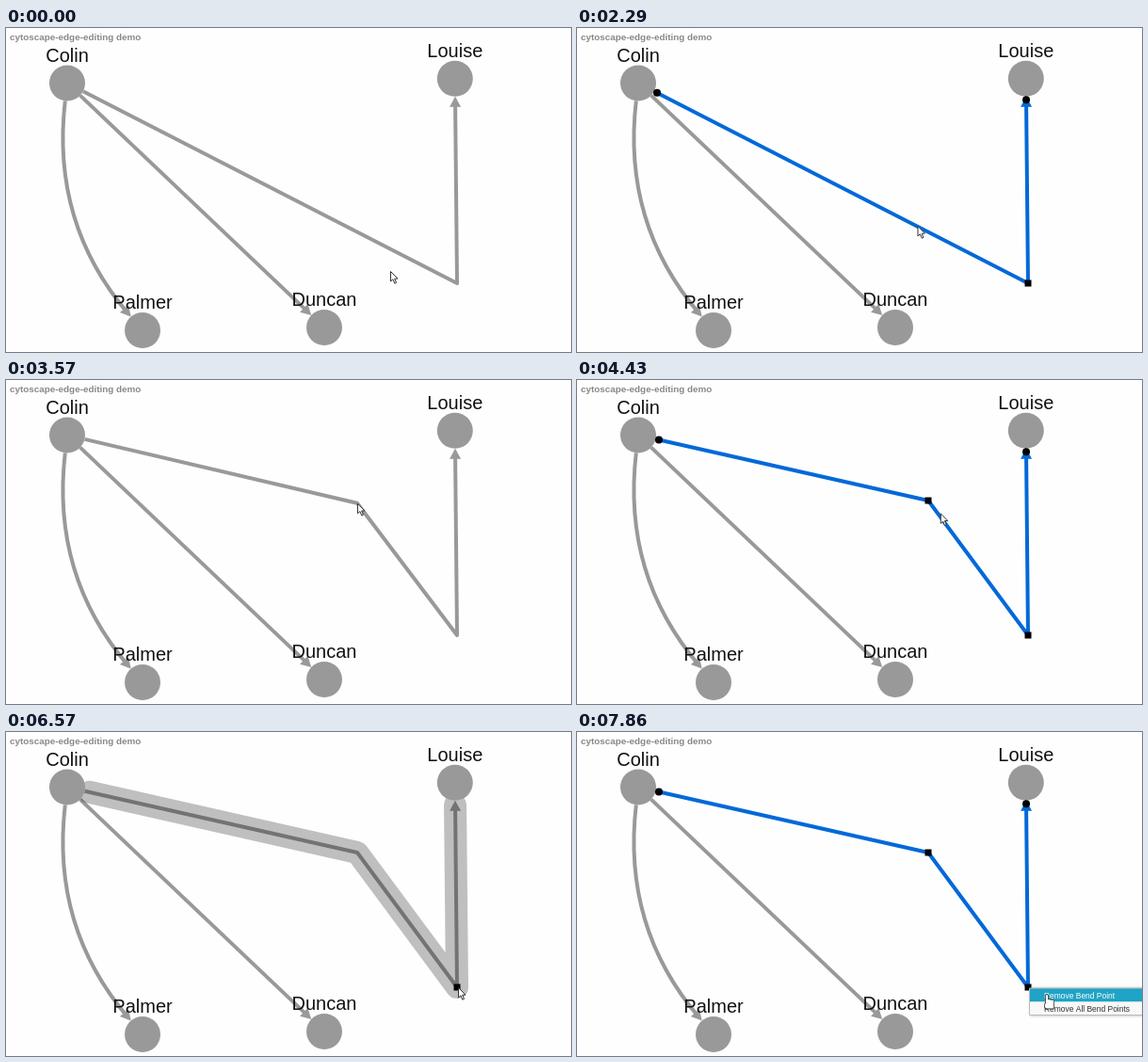
Animation, 600 px wide and 344 px high, one loop 8000 ms. Source, as an HTML page with a canvas:

```html
<!DOCTYPE html>
<html lang="en">
<head>
<meta charset="utf-8">
<title>Edge editing demo</title>
<style>
  html, body { margin: 0; width: 100%; height: 100%; overflow: hidden; background: #fefefe; }
  canvas { display: block; width: 600px; height: 344px; }
</style>
</head>
<body>
<canvas id="stage"></canvas>
<script>
const W = 600, H = 344, LOOP = 8000, TICK = 1000 / 7;
const FONT = '"Liberation Sans", Arial, sans-serif';
const GREY = '#999', BLUE = '#0169d9', R = 19;
const canvas = document.getElementById('stage');
const ctx = canvas.getContext('2d');
const dpr = window.devicePixelRatio || 1;
canvas.width = W * dpr;
canvas.height = H * dpr;

const NODES = { Colin: [65, 58.5], Louise: [476.8, 53.7], Palmer: [145, 321], Duncan: [338, 318] };
const { Colin, Louise, Palmer, Duncan } = NODES;
const CORNER = [479, 271], DROP = [373, 128];

// Ticks at which the story turns
const PRESS = 9, GRAB = 21, RELEASE = 28, RIGHT_PRESS = 46, MENU = 47, HOVER = 50;

// Pointer moves: first tick, last tick, destination
const REST = [408, 258];
const MOVES = [
  [4, 7, [429, 245]],
  [13, 20, [346, 202]],
  [GRAB, 27, [374, 128]],
  [29, 34, [389, 145]],
  [37, 40, [459, 259]],
  [40, 45, [480, 271]],
  [49, 55, [499, 279]]
];

const clamp = v => Math.min(1, Math.max(0, v));
const easeOut = f => 1 - (1 - f) ** 3;
const mix = (a, b, f) => a.map((v, i) => v + (b[i] - v) * f);
const toward = (a, b, d) => mix(a, b, d / Math.hypot(b[0] - a[0], b[1] - a[1]));

function pointerAt(k) {
  return MOVES.reduce((p, [from, to, goal]) =>
    mix(p, goal, easeOut(clamp((k - from) / (to - from)))), REST);
}

function trace(points) {
  ctx.beginPath();
  points.forEach(p => ctx.lineTo(p[0], p[1]));
}

function stroke(color, width, cap = 'butt') {
  ctx.strokeStyle = color;
  ctx.lineWidth = width;
  ctx.lineCap = cap;
  ctx.lineJoin = 'round';
  ctx.stroke();
}

function disc([x, y], r, color) {
  ctx.fillStyle = color;
  ctx.beginPath();
  ctx.arc(x, y, r, 0, 7);
  ctx.fill();
}

function square([x, y]) {
  ctx.fillStyle = '#000';
  ctx.fillRect(x - 3.5, y - 3.5, 7, 7);
}

function text(str, x, y, font, color, align = 'left') {
  ctx.font = font + ' ' + FONT;
  ctx.fillStyle = color;
  ctx.textAlign = align;
  ctx.fillText(str, x, y);
}

function arrowHead(node, from, color) {
  const tip = toward(node, from, R);
  ctx.save();
  ctx.translate(tip[0], tip[1]);
  ctx.rotate(Math.atan2(node[1] - from[1], node[0] - from[0]));
  trace([[0, 0], [-11, -6], [-11, 6]]);
  ctx.fillStyle = color;
  ctx.fill();
  ctx.restore();
}

// Route from node to node, stopping the given gaps short of their centres
function route(a, bends, b, gapA, gapB) {
  const via = [a, ...bends, b];
  return [toward(a, via[1], gapA), ...bends, toward(b, via[via.length - 2], gapB)];
}

function straightEdge(a, bends, b, color) {
  trace(route(a, bends, b, R, R + 8));
  stroke(color, 4);
  arrowHead(b, [a, ...bends].pop(), color);
}

function curvedEdge(a, b, bow) {
  const [x, y] = mix(a, b, .5);
  const dx = b[0] - a[0], dy = b[1] - a[1], len = Math.hypot(dx, dy);
  const control = [x - bow * dy / len, y + bow * dx / len];
  const [start, , end] = route(a, [control], b, R, R + 4);
  ctx.beginPath();
  ctx.moveTo(...start);
  ctx.quadraticCurveTo(...control, ...end);
  stroke(GREY, 4);
  arrowHead(b, control, GREY);
}

function drawNode([name, [x, y]]) {
  disc([x, y], R, GREY);
  text(name, x, y - R - 3.8, '20px', '#111', 'center');
}

function menu(hot) {
  const x = 480.5, y = 272, w = 125, h = 28.5;
  ctx.save();
  ctx.shadowColor = 'rgba(0,0,0,.35)';
  ctx.shadowBlur = 3;
  ctx.fillStyle = '#f8f8f8';
  ctx.fillRect(x, y, w, h);
  ctx.restore();
  ctx.fillStyle = '#1fa3c6';
  if (hot) ctx.fillRect(x, y, w, h / 2);
  ctx.strokeStyle = '#bbb';
  ctx.lineWidth = 1;
  ctx.strokeRect(x, y, w, h);
  ['Remove Bend Point', 'Remove All Bend Points'].forEach((label, i) =>
    text(label, 496, y + 10.5 + i * 14, '8.45px', hot && !i ? '#fff' : '#333'));
}

function arrowPointer() {
  trace([[.5, .5], [.5, 11], [2.9, 8.8], [4.8, 13.2], [6.5, 12.4], [4.7, 8.2], [8, 8.1]]);
  ctx.closePath();
  ctx.fillStyle = '#fff';
  ctx.fill();
  stroke('#333', 1);
}

function handPointer() {
  const fingers = new Path2D(), palm = new Path2D();
  for (let i = 0; i < 4; i++) fingers.roundRect(-1.2 + 2.1 * i, i && 4.4 + .4 * i, 2.2, 9, 1);
  palm.roundRect(-2, 8.5, 9, 6, 2);
  ctx.strokeStyle = '#222';
  ctx.lineWidth = 1.4;
  ctx.fillStyle = '#fff';
  for (const part of [palm, fingers]) ctx.stroke(part);
  for (const part of [fingers, palm]) ctx.fill(part);
}

function draw(t) {
  const k = Math.floor((t + 6) / TICK);
  const pointer = pointerAt(k);
  const dragging = k > GRAB && k < RELEASE;
  const pressed = [PRESS, GRAB, RIGHT_PRESS].includes(k);
  const selected = k > PRESS && !dragging && k !== RIGHT_PRESS;
  const bends = k <= GRAB ? [CORNER] : [dragging ? pointer : DROP, CORNER];

  ctx.setTransform(dpr, 0, 0, dpr, 0, 0);
  ctx.fillStyle = '#fefefe';
  ctx.fillRect(0, 0, W, H);
  text('cytoscape-edge-editing demo', 4, 13, 'bold 9.9px', '#888');

  straightEdge(Colin, [], Duncan, GREY);
  curvedEdge(Colin, Palmer, 60);
  straightEdge(Colin, bends, Louise, selected ? BLUE : GREY);
  if (pressed) {
    trace(route(Colin, bends, Louise, 24, 24));
    stroke(`rgba(0,0,0,${selected ? .22 : .25})`, 24, 'round');
  }
  Object.entries(NODES).forEach(drawNode);

  if (selected) {
    const ends = route(Colin, bends, Louise, 22.5, 22.5);
    [ends[0], ends[ends.length - 1]].forEach(p => disc(p, 4, '#000'));
    bends.forEach(square);
  }
  if (k === RIGHT_PRESS) square(CORNER);
  if (k >= MENU) menu(k >= HOVER);

  ctx.translate(...pointer);
  (k >= HOVER ? handPointer : arrowPointer)();
}

function loop(now) {
  draw(now % LOOP);
  requestAnimationFrame(loop);
}
draw(0);
requestAnimationFrame(loop);
</script>
</body>
</html>
```
